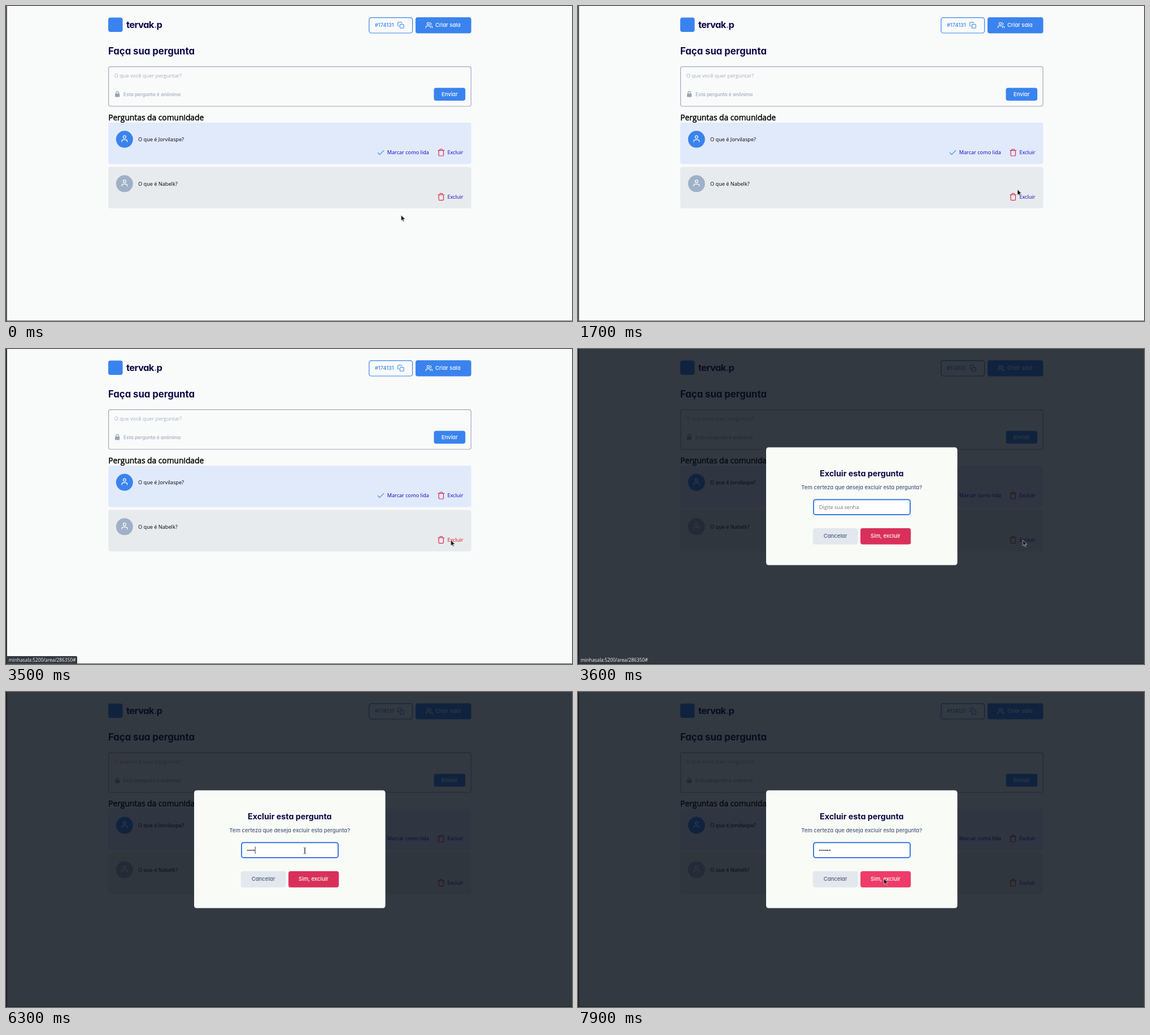
Animation, 1002 px wide and 559 px high, one loop 8000 ms. Source, as an HTML page:

```html
<!DOCTYPE html>
<html lang="pt-BR">
<head>
<meta charset="utf-8">
<title>Perguntas</title>
<style>
  :root { --blue: #3a83ee; --navy: #0d0947; --red: #d12d55; --link: #0a00c4; --slate: #4c5a7c; }
  html, body { margin: 0; width: 100%; height: 100%; overflow: hidden; background: #f9fbfb; }
  svg { display: block; width: 1002px; height: 559px; }
  text { font: 400 9.185px "Open Sans", "Noto Sans", sans-serif; white-space: pre; }
  .geo { font: 500 9.55px Inter, sans-serif; font-feature-settings: "cv11"; }
  .title { font-size: 16.7px; font-weight: 700; fill: var(--navy); }
  .brand { font-size: 16.5px; font-weight: 700; letter-spacing: -.6px; fill: var(--navy); }
  .mid { text-anchor: middle; }
  .small { font-size: 8.45px; fill: #a0aabb; }
  .heading { font-size: 13.8px; stroke: #000; stroke-width: .45px; }
  .hint { fill: #a5b0c3; }
  .link { fill: var(--link); }
  .icon { fill: none; stroke: currentColor; stroke-width: 2; stroke-linecap: round; stroke-linejoin: round; }
  .white { fill: #fff; color: #fff; }
  .blue { fill: var(--blue); color: var(--blue); }
  .red { color: var(--red); }

  .frame, .modal, .status, .pressed, .empty, .caret, .entry, .confirm, .pointer, .arrow, .beam {
    animation: 8s step-end infinite;
  }
  .frame { animation-name: focus; }
  .modal { animation-name: open; }
  .status { animation-name: status; }
  .pressed { animation-name: press; }
  .empty { animation-name: clear; }
  .entry { animation-name: type; }
  .caret { animation-name: blink; }
  .confirm { animation-name: hover; }
  .pointer { animation-name: point; }
  .arrow { animation-name: arrow; }
  .beam { animation-name: beam; }

  @keyframes focus { 0% { fill: #4a4a4f } 42.5%, 100% { fill: #1c1d22 } }
  @keyframes open { 0% { opacity: 0 } 45%, 100% { opacity: 1 } }
  @keyframes status { 0% { opacity: 0 } 33.75% { opacity: 1 } 50%, 100% { opacity: 0 } }
  @keyframes press { 0% { fill: var(--link) } 42.5% { fill: #d30d20 } 45%, 100% { fill: var(--link) } }
  @keyframes clear { 0% { opacity: 1 } 68.75%, 100% { opacity: 0 } }
  @keyframes blink {
    0% { opacity: 0 } 55% { opacity: 1 } 62.5% { opacity: 0 } 68.75% { opacity: 1 } 90%, 100% { opacity: 0 }
  }
  /* One bullet is 3.45px wide */
  @keyframes type {
    0% { transform: none }
    68.75% { transform: translateX(3.45px) }
    71.25% { transform: translateX(6.9px) }
    73.75% { transform: translateX(10.35px) }
    78.75% { transform: translateX(13.8px) }
    80% { transform: translateX(17.25px) }
    83.75%, 100% { transform: translateX(20.7px) }
  }
  @keyframes hover { 0% { fill: #d9305a } 91.25% { fill: #e43560 } 92.5%, 100% { fill: #ef3b69 } }
  @keyframes arrow { 0% { opacity: 1 } 52.5% { opacity: 0 } 90%, 100% { opacity: 1 } }
  @keyframes beam { 0% { opacity: 0 } 52.5% { opacity: 1 } 90%, 100% { opacity: 0 } }
  @keyframes point {
    0% { transform: translate(699.5px, 371px) }
    13.75% { transform: translate(728px, 381px) }
    15% { transform: translate(790px, 376px) }
    16.25% { transform: translate(813px, 370px) }
    17.5% { transform: translate(812px, 362px) }
    20% { transform: translate(800px, 345px) }
    21.25% { transform: translate(778px, 325.5px) }
    22.5% { transform: translate(764px, 332px) }
    23.75% { transform: translate(753px, 357px) }
    26.25% { transform: translate(775px, 350px) }
    27.5% { transform: translate(812px, 345px) }
    28.75% { transform: translate(803px, 332px) }
    30% { transform: translate(790px, 333px) }
    32.5% { transform: translate(789px, 335px) }
    33.75% { transform: translate(786px, 336px) }
    35% { transform: translate(784px, 338px) }
    36.25% { transform: translate(785px, 340px) }
    37.5% { transform: translate(786px, 340px) }
    38.75% { transform: translate(787px, 339.5px) }
    40% { transform: translate(787.5px, 339px) }
    47.5% { transform: translate(779px, 334px) }
    48.75% { transform: translate(735px, 318px) }
    50% { transform: translate(670px, 300px) }
    51.25% { transform: translate(605px, 288px) }
    52.5% { transform: translate(558px, 282px) }
    53.75% { transform: translate(535px, 281.5px) }
    55% { transform: translate(529px, 281.5px) }
    88.75% { transform: translate(531px, 287px) }
    90% { transform: translate(535px, 300px) }
    91.25% { transform: translate(540px, 318px) }
    92.5% { transform: translate(543px, 328px) }
    93.75% { transform: translate(542px, 331px) }
    97.5%, 100% { transform: translate(541.5px, 331px) }
  }
</style>
</head>
<body>
<svg viewBox="0 0 1002 559">
  <defs>
    <g id="user" class="icon" transform="scale(.6) translate(-12 -12)">
      <path d="M20 21v-2a4 4 0 0 0-4-4H8a4 4 0 0 0-4 4v2"/><circle cx="12" cy="7" r="4"/>
    </g>
    <g id="users" class="icon" transform="scale(.52) translate(-12 -12)">
      <path d="M17 21v-2a4 4 0 0 0-4-4H5a4 4 0 0 0-4 4v2M23 21v-2a4 4 0 0 0-3-3.87M16 3.13a4 4 0 0 1 0 7.75"/>
      <circle cx="9" cy="7" r="4"/>
    </g>
    <g id="copy" class="icon" transform="scale(.52) translate(-12 -12)">
      <rect x="9" y="9" width="13" height="13" rx="2"/>
      <path d="M5 15H4a2 2 0 0 1-2-2V4a2 2 0 0 1 2-2h9a2 2 0 0 1 2 2v1"/>
    </g>
    <g id="trash" class="icon" transform="scale(.6) translate(-12 -12)">
      <path d="M3 6h18M19 6v14a2 2 0 0 1-2 2H7a2 2 0 0 1-2-2V6M8 6V4a2 2 0 0 1 2-2h4a2 2 0 0 1 2 2v2"/>
    </g>
  </defs>

  <rect width="1002" height="559" fill="#f9fbfb"/>

  <!-- Header -->
  <rect class="blue" x="181" y="20.5" width="25.5" height="25.5" rx="4"/>
  <text class="geo brand" x="213" y="38.8">tervak<tspan fill="#3a83ee">.</tspan>p</text>
  <rect x="642.8" y="20.6" width="76.8" height="27.4" rx="4" fill="none" stroke="#3a83ee" stroke-width="1.2"/>
  <text class="geo blue" x="653" y="37.3" style="font-size:9.2px">#174131</text>
  <use class="blue" href="#copy" x="699" y="34"/>
  <rect class="blue" x="725" y="20" width="98.6" height="28.5" rx="4"/>
  <use class="white" href="#users" x="749" y="34"/>
  <text class="geo white" x="760" y="37.4">Criar sala</text>

  <!-- Question form -->
  <text class="geo title" x="181" y="86">Faça sua pergunta</text>
  <rect x="181.6" y="107.6" width="641.6" height="70.4" rx="3.5" fill="none" stroke="#a4a5bf" stroke-width="1.2"/>
  <text class="hint" x="191.7" y="127">O que você quer perguntar?</text>
  <rect x="193" y="155.2" width="8.2" height="6.3" rx="1.1" fill="#98a4b6"/>
  <path d="M194.8 156v-2a2.3 2.3 0 0 1 4.6 0v2" fill="none" stroke="#98a4b6" stroke-width="1.2"/>
  <text class="geo small" x="208" y="159.6">Esta pergunta é anônima</text>
  <rect class="blue" x="757.5" y="145.2" width="55.7" height="22.8" rx="4"/>
  <text class="geo white mid" x="785.3" y="159.8">Enviar</text>

  <!-- Questions -->
  <text class="heading" x="181.3" y="202.5">Perguntas da comunidade</text>
  <rect x="181" y="207" width="642.6" height="73.5" rx="4" fill="#e1eafb"/>
  <circle class="blue" cx="209.8" cy="236.6" r="15"/>
  <use class="white" href="#user" x="209.8" y="235.6"/>
  <text x="234" y="239.8">O que é Jorvilaspe?</text>
  <path class="icon blue" d="M20 6 9 17l-5-5" transform="translate(663.5 260) scale(.65) translate(-12 -11.5)" style="fill:none;stroke-width:1.8"/>
  <text class="link" x="674.7" y="263.2">Marcar como lida</text>
  <use class="red" href="#trash" x="770.3" y="260"/>
  <text class="link" x="781.4" y="263.2">Excluir</text>

  <rect x="181" y="285.5" width="642.6" height="73.7" rx="4" fill="#e8ebed"/>
  <circle cx="209.8" cy="315.3" r="15" fill="#9fb0c8"/>
  <use class="white" href="#user" x="209.8" y="314.3"/>
  <text x="234" y="318.5">O que é Nabelk?</text>
  <use class="red" href="#trash" x="770.3" y="338.6"/>
  <text class="pressed" x="781.4" y="341.9">Excluir</text>

  <!-- Dialog -->
  <g class="modal">
    <rect width="1002" height="559" fill="#080e18" fill-opacity=".82"/>
    <rect x="333" y="174.5" width="338.6" height="209" rx="4.5" fill="#f9fbf7"/>
    <text class="geo title mid" x="502.3" y="226.4" style="font-size:14.25px">Excluir esta pergunta</text>
    <text class="geo mid" x="502.3" y="248.7" fill="#4c5a7c">Tem certeza que deseja excluir esta pergunta?</text>
    <rect x="417" y="267.3" width="171" height="26.6" rx="3.5" fill="#fff" stroke="#3a7de4" stroke-width="2"/>
    <text x="426.8" y="284.2">••••••</text>
    <g class="entry">
      <rect x="426.8" y="273" width="30" height="16" fill="#fff"/>
      <rect class="caret" x="426.9" y="274.3" width=".9" height="12.6" fill="#222"/>
    </g>
    <text class="empty" x="426.8" y="284.2" fill="#757575">Digite sua senha</text>
    <rect x="415.7" y="318" width="79.8" height="28.8" rx="4" fill="#e3e8ee"/>
    <text class="geo mid" x="455.6" y="335.4" fill="#4c5a7c">Cancelar</text>
    <rect class="confirm" x="500" y="318" width="89.2" height="28.8" rx="4"/>
    <text class="geo white mid" x="544.4" y="335.4">Sim, excluir</text>
  </g>

  <!-- Window edge and link status -->
  <path class="frame" d="M0 0h1.8v558.2H1002v.8H0Z"/>
  <g class="status">
    <path d="M1.8 545H124a2 2 0 0 1 2 2v11.2H1.8Z" fill="#34393f"/>
    <text x="4.8" y="554.7" fill="#f4f4f4" style="font-size:8.35px;font-weight:500">minhasala:5200/area/286350#</text>
  </g>

  <g class="pointer">
    <path class="arrow" d="M0 0v10.2l2.3-2 1.7 3.6 1.5-.7-1.6-3.5h3.3Z" fill="#111" stroke="#fff" stroke-width=".6"/>
    <path class="beam" d="M-2.2-5.2q2.2 0 2.2 1v8.6q0 1-2.2 1M2.2-5.2q-2.2 0-2.2 1v8.6q0 1 2.2 1" fill="none" stroke="#333" stroke-width=".9"/>
  </g>
</svg>
</body>
</html>
```
